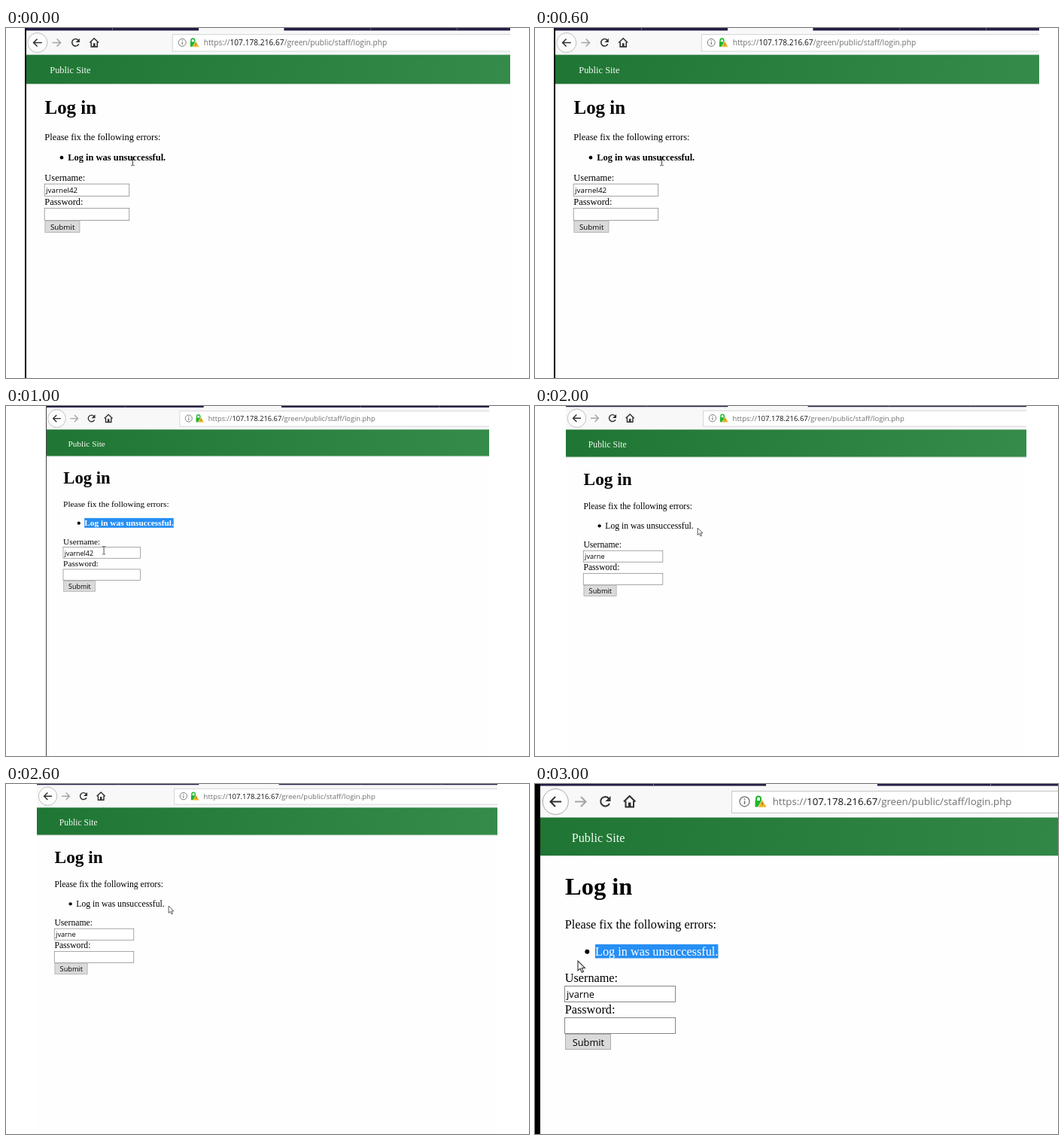
Animation of 695 by 465 pixels, one loop 4 s. Source, as an HTML page with a canvas:

```html
<!DOCTYPE html>
<html lang="en">
<head>
<meta charset="utf-8">
<title>Log in</title>
<style>
  html, body { margin: 0; width: 100%; height: 100%; overflow: hidden; background: #fff; }
  canvas { display: block; }
</style>
</head>
<body>
<canvas id="stage" width="695" height="465"></canvas>
<script>
const ctx = document.getElementById('stage').getContext('2d');
const SERIF = '"Liberation Serif", serif';
const SANS = '"Open Sans", "Noto Sans", sans-serif';
const HOLD = 1000;

// Each shot shows the same page at its own zoom, offset and crop.
const shots = [
  { zoom: .766, x: 20.9, y: 1.5, left: 25, right: 670, edge: 2, bold: true, user: 'jvarnel42', beam: [192.7, 229] },
  { zoom: .698, x: 48.4, y: .2, left: 53, right: 642, edge: 1, bold: true, selected: true, user: 'jvarnel42', beam: [117, 274.5] },
  { zoom: .718, x: 35.9, y: -.6, left: 41, right: 653, edge: 0, user: 'jvarne', arrow: [251, 226.5] },
  { zoom: 1, x: 0, y: 0, left: 0, right: 695, edge: 7, selected: true, user: 'jvarne', arrow: [57, 235] }
];

function rect(x, y, w, h, fill, stroke) {
  ctx.fillStyle = fill;
  ctx.fillRect(x, y, w, h);
  if (!stroke) return;
  ctx.strokeStyle = stroke;
  ctx.lineWidth = 1;
  ctx.strokeRect(x + .5, y + .5, w - 1, h - 1);
}

function text(str, x, y, font, color = '#000') {
  ctx.font = font;
  ctx.fillStyle = color;
  ctx.fillText(str, x, y);
  return x + ctx.measureText(str).width;
}

function shape(d, stroke, width, fill) {
  const path = new Path2D(d);
  if (fill) {
    ctx.fillStyle = fill;
    ctx.fill(path);
  }
  if (stroke) {
    ctx.strokeStyle = stroke;
    ctx.lineWidth = width;
    ctx.stroke(path);
  }
}

function circle(x, y, r, stroke, width, fill) {
  shape(`M${x - r} ${y}a${r} ${r} 0 1 1 ${2 * r} 0a${r} ${r} 0 1 1 ${-2 * r} 0`, stroke, width, fill);
}

function toolbar() {
  rect(0, -5, 1000, 50, '#f8f8f9');
  rect(0, -5, 307, 7.5, '#211e43');
  rect(455, -5, 545, 7.5, '#211e43');
  for (const x of [157, 605, 755]) rect(x, -5, 1, 7.5, '#77758c');

  circle(27.3, 23.5, 17, '#a9a9ab', 1, '#fdfdfd');
  shape('M35 23.5H21M27 17l-6.5 6.5 6.5 6.5', '#303033', 2);
  shape('M53 23.5h14M61 17l6.5 6.5-6.5 6.5', '#a5a5a7', 2);
  shape('M98 19a6.2 6.2 0 1 0 1 7', '#303033', 2);
  shape('M100.5 16v7h-7z', null, 0, '#303033');
  shape('M118 23.5l7.7-7.5 7.7 7.5M120.5 22.5v8h10.5v-8', '#303033', 2);
  shape('M124 24.5h3.5v6h-3.5z', null, 0, '#303033');

  rect(261, 9, 800, 30, '#fff', '#c6c6c8');
  circle(278.5, 23.3, 6.5, '#6b6b6d', 1.2);
  rect(277.8, 22.3, 1.5, 4.5, '#6b6b6d');
  rect(277.8, 19.3, 1.5, 1.6, '#6b6b6d');
  shape('M294 23v-3.5a3 3 0 0 1 6 0V22', '#20b52c', 2);
  rect(292.5, 22, 9.5, 8.5, '#20b52c');
  shape('M302 21l6 10h-12z', '#fff', .6, '#f2b322');
  rect(301.5, 24.5, 1, 3, '#6a4b10');

  const font = '13.3px ' + SANS;
  let x = text('https://', 315.7, 28.2, font, '#707073');
  x = text('107.178.216.67', x, 28.2, font, '#111');
  text('/green/public/staff/login.php', x, 28.2, font, '#707073');
}

function header() {
  const green = ctx.createLinearGradient(0, 0, 850, 60);
  green.addColorStop(0, '#1f7533');
  green.addColorStop(1, '#358b49');
  rect(0, 44.5, 1000, 50.7, green);
  rect(0, 95.2, 1000, 1, '#d5dcd6');
  text('Public Site', 48.7, 77, '16.25px ' + SERIF, '#f4faf5');
}

function form(shot) {
  const body = '16.25px ' + SERIF;
  text('Log in', 40, 147, 'bold 32.5px ' + SERIF);
  text('Please fix the following errors:', 39.7, 192, body);

  circle(69.3, 222.8, 3, null, 0, '#000');
  const message = 'Log in was unsuccessful.';
  ctx.font = (shot.bold ? 'bold ' : '') + body;
  if (shot.selected) rect(80, 213, ctx.measureText(message).width, 18.5, '#278ff3');
  text(message, 80, 227.5, ctx.font, shot.selected ? '#fff' : '#000');

  text('Username:', 39.7, 263.3, body);
  rect(39, 268, 148, 22, '#fff', '#858585');
  text(shot.user, 42, 284.2, '12.8px ' + SANS);
  text('Password:', 39.7, 304.8, body);
  rect(39, 310, 148, 22, '#fff', '#858585');
  rect(40, 332, 61, 21, '#dadada', '#adadad');
  text('Submit', 49.7, 347.6, '12.8px ' + SANS);
}

function pointer(shot) {
  const [x, y] = shot.beam || shot.arrow;
  ctx.translate(x, y);
  if (shot.beam) {
    shape('M-3-7.5h2l1 1 1-1h2M0-6.5v13M-3 7.5h2l1-1 1 1h2', '#333', 1.2);
  } else {
    shape('M0 0v13l3-2.8 2.3 5 2.2-1-2.3-4.7h4.2z', '#333', 1.1, '#fff');
  }
}

function draw(shot) {
  rect(0, 0, 695, 465, '#fff');
  ctx.save();
  ctx.beginPath();
  ctx.rect(shot.left, 0, shot.right - shot.left, 465);
  ctx.clip();
  rect(0, 0, 695, 465, '#fefefe');
  ctx.translate(shot.x, shot.y);
  ctx.scale(shot.zoom, shot.zoom);
  toolbar();
  header();
  form(shot);
  pointer(shot);
  ctx.restore();
  if (shot.edge) rect(shot.left, 0, shot.edge, 465, shot.edge > 1 ? '#000' : '#444');
}

function tick(now) {
  draw(shots[Math.floor(now / HOLD) % shots.length]);
  requestAnimationFrame(tick);
}
requestAnimationFrame(tick);
</script>
</body>
</html>
```
